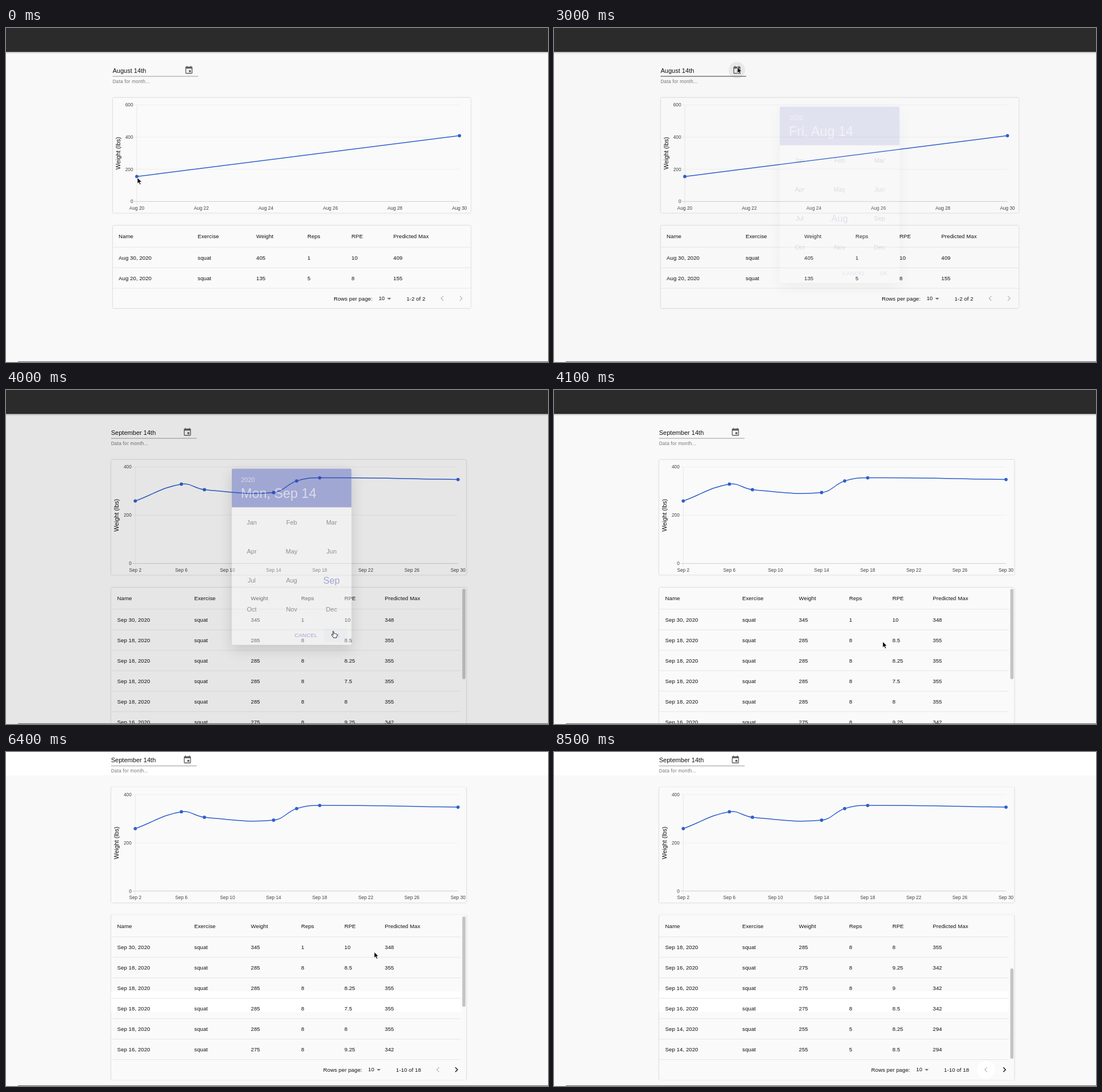
An HTML page for the animation above (9100 ms loop, 953 px wide and 588 px high).

```html
<!DOCTYPE html>
<html lang="en">
<head>
<meta charset="utf-8">
<title>Lifting log</title>
<style>
html, body { margin: 0; width: 100%; height: 100%; overflow: hidden; background: #f9f9f9; }
svg { display: block; width: 100vw; height: 100vh; }
text { font-family: "Liberation Sans", Arial, Helvetica, sans-serif; white-space: pre; }
.paper { fill: #fafafa; filter: drop-shadow(0 .8px .6px rgba(0,0,0,.3)) drop-shadow(0 .3px .8px rgba(0,0,0,.12)); }
.bar { fill: #2b2b2b; filter: drop-shadow(0 1.4px 1.6px rgba(0,0,0,.4)); }
.dialog { filter: drop-shadow(0 8px 12px rgba(0,0,0,.36)); }
</style>
</head>
<body>
<svg id="stage" viewBox="0 0 953 588"></svg>
<script>
const LOOP = 9100, STEP = 100;
const BLUE = '#2f5fcd', INDIGO = '#3a4ab8', INK = '#111';
const stage = document.getElementById('stage');

function el(parent, tag, attrs = {}) {
  const node = document.createElementNS('http://www.w3.org/2000/svg', tag);
  for (const k in attrs) node.setAttribute(k, attrs[k]);
  parent.appendChild(node);
  return node;
}
const group = (parent, attrs) => el(parent, 'g', attrs);
const rect = (parent, x, y, width, height, fill, more = {}) =>
  el(parent, 'rect', { x, y, width, height, fill, ...more });
const path = (parent, d, more) => el(parent, 'path', { d, ...more });
const dot = (parent, cx, cy, r, fill) => el(parent, 'circle', { cx, cy, r, fill });

// cy is the middle of the capital letters
function text(parent, x, cy, size, str, more = {}) {
  const node = el(parent, 'text', { x, y: cy + size * 0.36, 'font-size': size, fill: INK, ...more });
  node.textContent = str;
  return node;
}
const cell = (parent, x, cy, str, more) =>
  text(parent, x, cy, 9.6, str, { 'letter-spacing': 0.08, ...more });
const show = (node, on) => node.setAttribute('display', on ? 'inline' : 'none');
const fade = (node, o) => { node.setAttribute('opacity', o); show(node, o > 0); };
const move = (node, x, y) => node.setAttribute('transform', `translate(${x} ${y})`);

// Smooth curve through points, tension 0.4
function spline(pts) {
  const ctrl = pts.map((p, i) => {
    const a = pts[i - 1] || p, b = pts[i + 1] || p;
    const d1 = Math.hypot(p[0] - a[0], p[1] - a[1]);
    const d2 = Math.hypot(b[0] - p[0], b[1] - p[1]);
    const k1 = 0.4 * d1 / (d1 + d2), k2 = 0.4 * d2 / (d1 + d2);
    const dx = b[0] - a[0], dy = b[1] - a[1];
    return { before: [p[0] - k1 * dx, p[1] - k1 * dy], after: [p[0] + k2 * dx, p[1] + k2 * dy] };
  });
  return pts.map((p, i) => i ? `C${ctrl[i - 1].after} ${ctrl[i].before} ${p}` : `M${p}`).join('');
}

const TOP = 135.5, BASE = 305.3;

function field(parent, x, label) {
  const g = group(parent);
  const hover = dot(g, x + 134.3, 74.3, 14.5, 'rgba(0,0,0,.06)');
  text(g, x, 74.6, 11.05, label);
  const line = rect(g, x, 84.6, 150.5, 0.9, '#8e8e8e');
  text(g, x, 94, 8.2, 'Data for month...', { fill: '#757575', 'letter-spacing': 0.26 });
  path(g, 'M17 12h-5v5h5zM16 1v2H8V1H6v2H5c-1.1 0-2 .9-2 2v14c0 1.1.9 2 2 2h14c1.1 0 2-.9 2-2V5c0-1.1-.9-2-2-2h-1V1zM19 19H5V8h14z',
    { transform: `translate(${x + 126} 66) scale(.6875)`, fill: '#5f5f5f', 'fill-rule': 'evenodd' });
  return { hover, line };
}

function chart(parent, c) {
  const g = group(parent);
  rect(g, c.paper[0], 122.5, c.paper[1], 203.3, '', { class: 'paper', rx: 2.5 });
  const yOf = v => BASE - v / c.max * (BASE - TOP);
  const xOf = d => c.x0 + (d - c.first) / (c.last - c.first) * (c.x1 - c.x0);
  for (let v = 0; v <= c.max; v += 200) {
    rect(g, c.x0 - 5, yOf(v) - 0.4, c.x1 - c.x0 + 5, 0.8, v ? '#ececec' : '#c2c2c2');
    text(g, c.x0 - 6.5, yOf(v), 8.3, v, { 'text-anchor': 'end', fill: '#444' });
  }
  rect(g, c.x0 - 0.4, TOP, 0.8, BASE - TOP + 7, '#e4e4e4');
  for (let d = c.first; d <= c.last; d += c.gap)
    text(g, xOf(d), 317, 8.3, `${c.month} ${d}`, { 'text-anchor': 'middle', fill: '#444' });
  text(g, 0, 0, 10.8, 'Weight (lbs)',
    { 'text-anchor': 'middle', transform: `translate(${c.x0 - 33} 220.5) rotate(-90)` });
  const pts = c.data.map(([d, v]) => [xOf(d), yOf(v)]);
  path(g, spline(pts), { fill: 'none', stroke: BLUE, 'stroke-width': 1.5 });
  pts.forEach(p => dot(g, p[0], p[1], 2.9, BLUE));
  return pts;
}

function tooltip(parent, [x, y], title, value, width, left) {
  const g = group(parent);
  const bx = left ? x - 5 - width : x + 5;
  const edge = left ? bx + width : bx, tip = left ? edge + 3.5 : edge - 3.5;
  dot(g, x, y, 3.5, BLUE);
  rect(g, bx, y - 15, width, 30, 'rgba(0,0,0,.8)', { rx: 4 });
  path(g, `M${edge} ${y - 3.5}L${tip} ${y}L${edge} ${y + 3.5}z`, { fill: 'rgba(0,0,0,.8)' });
  text(g, bx + 4, y - 6.5, 8.25, title, { fill: '#fff', 'font-weight': 'bold' });
  rect(g, bx + 4.3, y + 2.6, 7.6, 7.6, BLUE, { stroke: '#fff', 'stroke-width': 0.7 });
  text(g, bx + 14, y + 6.4, 8.25, value, { fill: '#fff' });
  return g;
}

function rowsOf(parent, cols, rows, x, width) {
  rows.forEach((row, i) => {
    const y = 404.3 + i * 36;
    row.forEach((v, k) => cell(parent, cols[k], y, v));
    rect(parent, x, y + 17.4, width, 0.8, '#e2e2e2');
  });
}
function heading(parent, cols, x, width) {
  ['Name', 'Exercise', 'Weight', 'Reps', 'RPE', 'Predicted Max']
    .forEach((s, k) => cell(parent, cols[k], 367, s));
  rect(parent, x, 385.5, width, 0.8, '#e2e2e2');
}
function chevron(parent, x, y, dir) {
  return path(parent, `M${x - 2 * dir} ${y - 4}l${4 * dir} 4l${-4 * dir} 4`,
    { fill: 'none', stroke: '#bdbdbd', 'stroke-width': 1.4 });
}
function footer(parent, x, y, range) {
  cell(parent, x, y, 'Rows per page:');
  cell(parent, x + 79, y - 0.3, '10');
  path(parent, `M${x + 94} ${y - 1.4}h7l-3.5 3.5z`, { fill: '#757575' });
  return cell(parent, x + 128, y, range);
}

// Build the scene
rect(stage, 0, 0, 953, 588, '#f9f9f9');
const band = rect(stage, 0, 0, 953, 41, '#fff');
const page = group(stage);
const aug = group(page), sep = group(page);

const augField = field(aug, 187.4, 'August 14th');
const augPts = chart(aug, { paper: [187.6, 629.6], x0: 230, x1: 797.3, max: 600, month: 'Aug',
  first: 20, last: 30, gap: 2, data: [[20, 155], [30, 409]] });
rect(aug, 187.6, 347.5, 629.6, 146, '', { class: 'paper', rx: 2.5 });
const augCols = [198, 337, 440, 530, 607.5, 681];
heading(aug, augCols, 187.6, 629.6);
rowsOf(aug, augCols, [
  ['Aug 30, 2020', 'squat', 405, 1, 10, 409],
  ['Aug 20, 2020', 'squat', 135, 5, 8, 155]], 187.6, 629.6);
footer(aug, 576.2, 476.3, '1-2 of 2');
chevron(aug, 767, 476, -1);
chevron(aug, 800, 476, 1);
const tips = [
  [tooltip(aug, augPts[0], 'Aug 20, 2020', 155, 58), 200, 1100],
  [tooltip(aug, augPts[1], 'Aug 30, 2020', 409, 58, true), 1800, 2200]];

show(field(sep, 184.7, 'September 14th').hover, false);
const sepPts = chart(sep, { paper: [184.6, 625], x0: 227.3, x1: 794.8, max: 400, month: 'Sep',
  first: 2, last: 30, gap: 4,
  data: [[2, 259], [6, 329], [8, 306], [14, 294], [16, 342], [18, 355], [30, 348]] });
rect(sep, 184.6, 347.5, 625, 290, '', { class: 'paper', rx: 2.5 });
const clip = el(el(stage, 'defs'), 'clipPath', { id: 'body' });
rect(clip, 184, 386, 617, 216, '#000');
const rowBand = rect(sep, 184.6, 427, 615, 36, '#fff');
const list = group(sep, { 'clip-path': 'url(#body)' });
const sepCols = [195.5, 331, 430.5, 519, 595, 666];
const lift = s => {
  const [day, weight, reps, rpe, max] = s.split(' ');
  return [`Sep ${day}, 2020`, 'squat', weight, reps, rpe, max];
};
const pages = [
  ['30 345 1 10 348', '18 285 8 8.5 355', '18 285 8 8.25 355', '18 285 8 7.5 355', '18 285 8 8 355',
   '16 275 8 9.25 342', '16 275 8 9 342', '16 275 8 8.5 342', '14 255 5 8.25 294', '14 255 5 8.5 294'],
  ['14 255 5 8 294', '8 245 8 8 306', '8 245 8 8.5 306', '8 245 8 7.5 306',
   '6 285 5 8 329', '6 285 5 8.5 329', '2 225 5 8 259', '2 225 5 7.5 259']
].map(rows => {
  const g = group(list);
  rowsOf(g, sepCols, rows.map(lift), 184.6, 615);
  return g;
});
heading(sep, sepCols, 184.6, 615);
const thumb = rect(sep, 802.3, 350, 5.6, 159, '#c4c4c4', { rx: 2.8 });
rect(sep, 184.6, 601.7, 615, 0.8, '#e2e2e2');
const halo = dot(sep, 759.5, 619.8, 16, '#fff');
const range = footer(sep, 557.8, 619.8, '');
const prev = chevron(sep, 759.5, 619.8, -1), next = chevron(sep, 792, 619.8, 1);
tips.push([tooltip(sep, sepPts[1], 'Sep 6, 2020', 329, 53), 4800, 5200]);

rect(page, -4, -20, 961, 62, '', { class: 'bar' });
rect(stage, 21, 586.8, 932, 1.2, '#777');

// Date dialog
const shade = rect(stage, 0, 42, 953, 546, '#000');
const dialog = group(stage, { class: 'dialog' });
rect(dialog, 397, 138.5, 210.5, 310.3, '#fff', { rx: 2.6 });
path(dialog, 'M397 206.5v-65.4q0-2.6 2.6-2.6h205.3q2.6 0 2.6 2.6v65.4z', { fill: INDIGO });
const pale = { fill: 'rgba(255,255,255,.72)' };
text(dialog, 413.2, 158, 11, '2020', pale);
const picked = text(dialog, 413, 181.8, 23.4, '', pale);
const months = 'Jan Feb Mar Apr May Jun Jul Aug Sep Oct Nov Dec'.split(' ').map((name, i) => {
  const x = 432 + i % 3 * 70.2, y = 233.5 + Math.floor(i / 3) * 50.9;
  const at = { 'text-anchor': 'middle' };
  return [text(dialog, x, y, 11, name, at), text(dialog, x, y, 16.4, name, { ...at, fill: INDIGO })];
});
const okHover = rect(dialog, 559, 419.5, 41, 23.5, '#f3f5fb', { rx: 2.6 });
const action = { fill: INDIGO, 'letter-spacing': 0.26 };
text(dialog, 507.2, 431.5, 9.6, 'CANCEL', action);
text(dialog, 572.6, 431.5, 9.6, 'OK', action);

// Pointers, both with the tip at 0,0
const arrow = group(stage), hand = group(stage);
const rim = { stroke: '#fff', 'stroke-width': 0.8, 'stroke-linejoin': 'round' };
path(arrow, 'M0 0V10.6L2.5 8.3L4.2 12.3L6.1 11.5L4.4 7.6H7.7z', { fill: '#000', ...rim });
path(hand, 'M-1 .8Q-.8-.4.2 0Q.9.3 1 4.2Q2.4 3.4 3 4.6Q4.5 4 5 5.1Q6.6 4.6 6.8 6.2Q7 8.4 5.8 10V11.6H.3Q-.8 9.4-3 7Q-3.6 5.6-2.2 5.6L-.2 7.2z',
  { fill: '#fff', stroke: '#111', 'stroke-width': 0.9, 'stroke-linejoin': 'round' });

// Key tables: time, value(s)
const cursorKeys = [
  [0, 231, 263.5], [1000, 231, 263.5], [1500, 805, 158], [1600, 805, 158], [1900, 798, 191],
  [2200, 798, 191], [2600, 440, 230], [2800, 318, 34], [2900, 322.5, 69], [3100, 322.5, 69],
  [3400, 571, 332], [3700, 571, 332], [3900, 575.5, 424.5], [4000, 575.5, 424.5], [4100, 578, 443],
  [4500, 228.5, 194], [4700, 228.5, 194], [4900, 309, 166], [5100, 309, 166], [5200, 340, 181],
  [5600, 778, 269], [5700, 778, 269], [6300, 608, 336], [6600, 760, 398], [6700, 760, 398],
  [7100, 739, 387], [7500, 773, 365], [7700, 773, 365], [7900, 791, 557], [8000, 791, 557],
  [8200, 759, 557], [8500, 759, 557]];
const pageKeys = [[5200, 0], [5500, 5.4], [5700, 5.4], [6200, 60.5]];
const listKeys = [[6700, 0], [7100, 144]];
const dialogKeys = [[2900, 0], [3000, 0.12], [3100, 0.6], [3200, 0.92], [3300, 1], [3900, 1], [4000, 0.4], [4100, 0]];

function at(keys, t) {
  if (t <= keys[0][0]) return keys[0].slice(1);
  for (let i = 1; i < keys.length; i++) {
    const a = keys[i - 1], b = keys[i];
    if (t > b[0]) continue;
    const p = (t - a[0]) / (b[0] - a[0]), e = p * p * (3 - 2 * p);
    return b.slice(1).map((v, k) => a[k + 1] + (v - a[k + 1]) * e);
  }
  return keys[keys.length - 1].slice(1);
}
const within = (t, a, b) => t >= a && t < b;
const clamp = v => Math.max(0, Math.min(1, v));

function draw(t) {
  const isSep = t >= 4000;
  show(aug, !isSep);
  show(sep, isSep);

  const [scroll] = at(pageKeys, t);
  move(page, 0, -scroll);
  show(band, scroll > 6);
  show(rowBand, t >= 4700);
  rowBand.setAttribute('y', 421.5 + scroll);

  const focus = within(t, 2900, 4000);
  show(augField.hover, focus);
  augField.line.setAttribute('fill', focus ? '#222' : '#8e8e8e');
  for (const [tip, from, to] of tips)
    fade(tip, Math.min(clamp((t - from) / 250), clamp((to + 200 - t) / 200)));

  const second = within(t, 7900, 8200);
  const offset = second ? 72 : at(listKeys, t)[0];
  pages.forEach((g, i) => {
    show(g, second === (i === 1));
    move(g, 0, -offset);
  });
  thumb.setAttribute('y', second ? 402 : 350 + offset / 144 * 91.5);
  thumb.setAttribute('height', second ? 198.5 : 159);
  range.textContent = second ? '11-18 of 18' : '1-10 of 18';
  prev.setAttribute('stroke', second ? '#111' : '#bdbdbd');
  next.setAttribute('stroke', second ? '#bdbdbd' : '#111');
  show(halo, t >= 8200);

  const [open] = at(dialogKeys, t);
  fade(dialog, open);
  fade(shade, 0.5 * open * open);
  const chosen = t < 3500 ? 7 : 8;
  picked.textContent = t < 3500 ? 'Fri, Aug 14' : 'Mon, Sep 14';
  months.forEach(([plain, big], i) => {
    show(plain, i !== chosen);
    show(big, i === chosen);
  });
  show(okHover, t >= 3900);

  const [x, y] = at(cursorKeys, t);
  const pointing = within(t, 3300, 4100) || within(t, 7900, 8500);
  move(arrow, x, y);
  move(hand, x, y);
  show(arrow, !pointing && t < 8500);
  show(hand, pointing);
}

const start = performance.now();
function tick(now) {
  const t = Math.max(0, now - start) % LOOP;
  draw(Math.floor(t / STEP) * STEP);
  requestAnimationFrame(tick);
}
draw(0);
requestAnimationFrame(tick);
</script>
</body>
</html>
```
